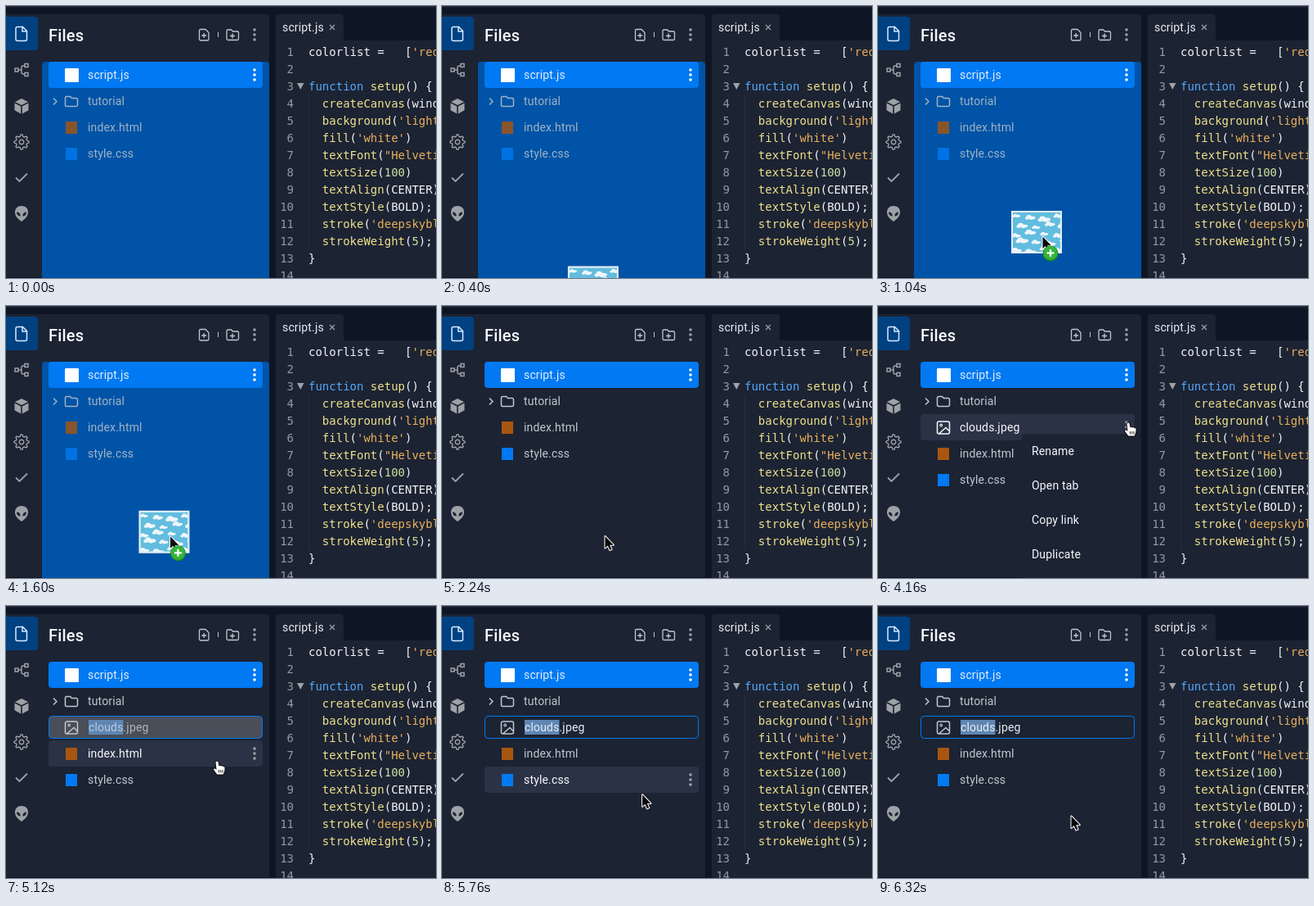
Recreate the animation shown at these times as an HTML page with a canvas. Size 526 by 332 pixels, loop 6400 ms.

```html
<!DOCTYPE html>
<html lang="en">
<head>
<meta charset="utf-8">
<title>File panel</title>
<style>
html, body { margin: 0; height: 100%; overflow: hidden; background: #0e1525; }
canvas { display: block; }
</style>
</head>
<body>
<canvas width="526" height="332"></canvas>
<script>
const ctx = document.querySelector('canvas').getContext('2d');
const LOOP = 6400, DROP = 1700, LISTED = 2800, MENU = 3920, RENAME = 5040;
const PANEL = '#1c2333', HOVER = '#2b3245', BLUE = '#0079f2', TEXT = '#c2c8cc', BRIGHT = '#f5f9fc', MUTED = '#9da2a6';
const UI = '14px Roboto, sans-serif', MONO = '14px "DejaVu Sans Mono", monospace';

// time, x, y of the pointer
const track = [
  [0, 185, 400], [880, 201, 281], [1500, 201, 281], [1800, 199, 280.5], [2800, 199, 280.5],
  [3360, 240, 152], [3700, 306, 142], [4360, 306, 142], [4800, 258, 189],
  [5440, 258, 189], [6000, 236, 256], [LOOP, 236, 256]
];

const code = [
  "w:colorlist =   [|s:'red', 'orange'",
  '',
  'k:function |f:setup|w:() {',
  'f:  createCanvas|w:(windowWidth, windowHeight);',
  "f:  background|w:(|s:'lightblue'|w:);",
  "f:  fill|w:(|s:'white'|w:)",
  'f:  textFont|w:(|s:"Helvetica"|w:);',
  'f:  textSize|w:(|n:100|w:)',
  'f:  textAlign|w:(CENTER);',
  'f:  textStyle|w:(BOLD);',
  "f:  stroke|w:(|s:'deepskyblue'|w:);",
  'f:  strokeWeight|w:(|n:5|w:);',
  'w:}',
  ''
];
const syntax = { w: '#f2f4f6', k: '#55a8fa', f: '#eee08c', s: '#e8b05c', n: '#c9dfa0' };

const clamp = v => Math.max(0, Math.min(1, v));
const smooth = v => v * v * (3 - 2 * v);

function pointer(t) {
  const i = Math.max(1, track.findIndex(k => k[0] >= t));
  const [t0, x0, y0] = track[i - 1], [t1, x1, y1] = track[i];
  const k = smooth(clamp((t - t0) / (t1 - t0)));
  return [x0 + (x1 - x0) * k, y0 + (y1 - y0) * k];
}

function box(x, y, w, h, color, r = 0) {
  ctx.fillStyle = color;
  ctx.beginPath();
  ctx.roundRect(x, y, w, h, r);
  ctx.fill();
}

function disc(x, y, r, color) {
  ctx.fillStyle = color;
  ctx.beginPath();
  ctx.arc(x, y, r, 0, 7);
  ctx.fill();
}

function line(d, color, width = 1.5) {
  ctx.strokeStyle = color;
  ctx.lineWidth = width;
  ctx.stroke(new Path2D(d));
}

function shape(d, color) {
  ctx.fillStyle = color;
  ctx.fill(new Path2D(d));
}

function text(s, x, y, color, font = UI, spacing = 0.16) {
  ctx.font = font;
  ctx.letterSpacing = spacing + 'px';
  ctx.fillStyle = color;
  ctx.fillText(s, x, y);
  return ctx.measureText(s).width;
}

function at(x, y, draw) {
  ctx.save();
  ctx.translate(x, y);
  draw();
  ctx.restore();
}

function kebab(x, y, color) {
  for (const dy of [-6, 0, 6]) disc(x, y + dy, 1.8, color);
}

function sidebar() {
  box(0, 13, 39, 41, '#004182', [0, 4, 4, 0]);
  line('M14 25.5h6.5l5 5v10a2 2 0 0 1-2 2h-9.5a2 2 0 0 1-2-2v-13a2 2 0 0 1 2-2zM20 26v5h5', '#d5eaff');
  line('M15 78h4M23 73h-2q-2 0-2 2v6q0 2 2 2h2M11 76h4v4h-4zM23 70.500h4v4h-4zM23 81.500h4v4h-4z', MUTED, 1.5);
  shape('M19 113l8 4-8 4-8-4zM10.5 118.5l7.7 4v9l-7.7-4.3zM27.5 118.5l-7.7 4v9l7.7-4.3z', MUTED);
  at(19, 166, () => {
    ctx.beginPath();
    for (let i = 0; i < 32; i++) {
      const a = (i - 0.5) * Math.PI / 16, r = i % 4 < 2 ? 9 : 6.8;
      ctx.lineTo(r * Math.cos(a), r * Math.sin(a));
    }
    ctx.closePath();
    ctx.moveTo(2.8, 0);
    ctx.arc(0, 0, 2.8, 0, 7);
    ctx.strokeStyle = MUTED;
    ctx.lineWidth = 1.4;
    ctx.stroke();
  });
  line('M12 209.500l4.500 4.500 9.500-9.500', MUTED, 1.8);
  shape('M19 244c5 0 8 3.200 8 8 0 4.500-4 8.500-8 11-4-2.500-8-6.500-8-11 0-4.800 3-8 8-8z', MUTED);
  shape('M13 251.500q4.500 0 4.700 5q-4.500 0-4.700-5zM25 251.500q-4.500 0-4.700 5q4.500 0 4.700-5z', PANEL);
}

function editor() {
  box(330, 10, 83, 34, PANEL, [4, 4, 0, 0]);
  box(330, 42, 196, 290, PANEL);
  text('script.js', 338, 31, '#e8ecf0');
  line('M396 23l6 6M402 23l-6 6', MUTED, 1.2);
  line('M370.5 108V297', '#262e40', 1);
  code.forEach((row, i) => {
    const y = 61 + 21 * i;
    ctx.textAlign = 'right';
    text(i + 1, 352, y, '#9299a4', MONO, 0);
    ctx.textAlign = 'left';
    let x = 370;
    if (row) for (const part of row.split('|')) x += text(part.slice(2), x, y, syntax[part[0]], MONO, 0);
  });
  shape('M356 94h8.500l-4.250 8z', MUTED);
}

const icons = {
  script: () => box(0, 0, 17, 17, '#ffffff', 1),
  folder: c => {
    line('M2 2.500h4.500l2 2h5.500a1.500 1.500 0 0 1 1.500 1.500v7a1.500 1.500 0 0 1-1.500 1.500h-12a1.500 1.500 0 0 1-1.500-1.500v-9a1.500 1.500 0 0 1 1.500-1.500z', c);
    line('M-14 4.500l4 4-4 4', c);
  },
  image: c => {
    line('M2.500 1h11a2 2 0 0 1 2 2v11a2 2 0 0 1-2 2h-11a2 2 0 0 1-2-2v-11a2 2 0 0 1 2-2zM3 15.500l8-7 4 4', c);
    line('M6.500 5.500a1.300 1.300 0 1 1-2.600 0a1.300 1.300 0 1 1 2.600 0z', c, 1.2);
  },
  html: () => box(1, 1, 14, 15, '#a8560f'),
  css: () => box(1, 1, 14, 15, BLUE)
};

function fileRow(name, icon, i, hovered) {
  const y = 68 + 32 * i, color = hovered || !i ? BRIGHT : TEXT;
  if (!i || hovered) {
    box(52, y, 262, 32, i ? HOVER : BLUE, 4);
    kebab(304, y + 16, i ? MUTED : '#ffffff');
  }
  at(72, y + 8, () => icons[icon](color));
  text(name, 100, y + 21, i ? color : '#e0efff');
}

function renameField(t) {
  const k = clamp((t - RENAME - 80) / 240);
  box(52.5, 134.5, 261, 27, `rgba(78,83,94,${0.9 * (1 - k)})`, 4);
  ctx.strokeStyle = BLUE;
  ctx.lineWidth = 1;
  ctx.stroke();
  at(72, 140, () => icons.image(TEXT));
  ctx.font = UI;
  ctx.letterSpacing = '0.16px';
  box(101, 139, ctx.measureText('clouds').width, 18, '#5f86b3');
  ctx.globalAlpha = 0.65 + 0.35 * k;
  text('clouds.jpeg', 101, 153, '#e8edf2');
  ctx.globalAlpha = 1;
}

function files(t, hover) {
  box(0, 10, 322, 321, PANEL, [0, 4, 0, 0]);
  const over = 1 - clamp((t - DROP) / 200);
  ctx.globalAlpha = over;
  box(44, 68, 278, 264, '#0053a6', [4, 4, 0, 0]);
  ctx.globalAlpha = 1;
  text('Files', 52, 43, BRIGHT, '500 20px Roboto, sans-serif', 0.2);
  line('M238 28.500h6l4 4v8a1.500 1.500 0 0 1-1.500 1.500h-8.500a1.500 1.500 0 0 1-1.500-1.500v-10.500a1.500 1.500 0 0 1 1.500-1.500zM242.200 33v6M239.200 36h6', TEXT, 1.3);
  line('M259.500 32v6', TEXT, 1);
  line('M271.500 29h4l2 2h5.500a1.500 1.500 0 0 1 1.500 1.500v7.500a1.500 1.500 0 0 1-1.500 1.500h-11.500a1.500 1.500 0 0 1-1.500-1.500v-9.500a1.500 1.500 0 0 1 1.500-1.500zM277 33.500v6M274 36.500h6', TEXT, 1.3);
  kebab(304, 35, MUTED);

  const list = [['script.js', 'script'], ['tutorial', 'folder'], ['index.html', 'html'], ['style.css', 'css']];
  if (t >= LISTED) list.splice(2, 0, ['clouds.jpeg', 'image']);
  list.forEach(([name, icon], i) => {
    if (i === 2 && t >= RENAME) return renameField(t);
    ctx.globalAlpha = i ? 1 - 0.18 * over : 1;
    fileRow(name, icon, i, i > 0 && i === hover);
    ctx.globalAlpha = 1;
  });
}

function menu(y) {
  box(176, 156, 146, 176, PANEL, [4, 4, 0, 0]);
  ['Rename', 'Open tab', 'Copy link', 'Duplicate'].forEach((label, i) => {
    const top = 156 + 42 * i;
    if (y >= top && y < top + 42) box(176, top, 146, 42, HOVER, 4);
    text(label, 188, top + 26, BRIGHT);
  });
}

function cloud(x, y, s) {
  ctx.fillStyle = '#eef6fa';
  for (const [dx, dy, r] of [[-4, 1, 2], [-1.5, -0.8, 2.6], [1.5, 0.8, 2.6], [4.5, 0.5, 2]]) {
    ctx.beginPath();
    ctx.ellipse(x + dx * s, y + dy * s, r * s * 1.2, r * s * 0.9, 0, 0, 7);
    ctx.fill();
  }
}

function thumbnail() {
  box(-38, -31, 62, 52, '#e3edf2');
  ctx.save();
  ctx.beginPath();
  ctx.rect(-36, -29, 58, 48);
  ctx.clip();
  box(-36, -29, 58, 48, '#62bddf');
  for (let i = 0; i < 20; i++) {
    const row = i >> 2;
    cloud(-32 + (i % 4) * 17 + (row % 2) * 7, -25 + row * 10 + (i % 3) * 2, 0.75 + (i * 7 % 5) * 0.1);
  }
  ctx.restore();
}

function outlined(d, fill, stroke) {
  ctx.lineJoin = 'round';
  line(d, stroke, 2);
  shape(d, fill);
  ctx.lineJoin = 'miter';
}

function cursor(t, x, y) {
  at(x, y, () => {
    if (t < DROP) thumbnail();
    if (t >= LISTED && y < 228) {
      outlined('M-1.500 1.500q1.500-2 3 0l1 5 1-.8 1.500.8 1.200-.4 1.300 1 1.300 0 .8 1.500-.4 4-1.500 4h-7.500l-4-5.500q-.8-2 1.500-1.600l1.800 1.300z', '#ffffff', '#111111');
      line('M2.500 11v3.500M4.800 11v3.500M7 11v3.500', '#111111', 0.9);
    } else {
      outlined('M.5.5v14.500l3.300-3 2.500 5.500 2.300-1-2.400-5.300h4.600z', '#080808', '#ffffff');
    }
    if (t < DROP) {
      disc(10, 21, 9.5, '#1c8a22');
      disc(10, 20.500, 8.500, '#35b43a');
      line('M10 16v9M5.500 20.500h9', '#ffffff', 2.2);
    }
  });
}

function draw(now) {
  const t = now % LOOP, [x, y] = pointer(t);
  const menuOpen = t >= MENU && t < RENAME;
  const lagged = pointer(Math.max(0, t - 120))[1];
  const hover = menuOpen ? 2 : t < LISTED ? -1 : Math.floor((lagged - 68) / 32);
  box(0, 0, 526, 332, '#0e1525');
  box(0, 0, 526, 1.5, '#252d3f');
  files(t, hover);
  sidebar();
  editor();
  if (menuOpen) menu(y);
  cursor(t, x, y);
}

const start = performance.now();
(function tick() {
  draw(performance.now() - start);
  requestAnimationFrame(tick);
})();
</script>
</body>
</html>
```
